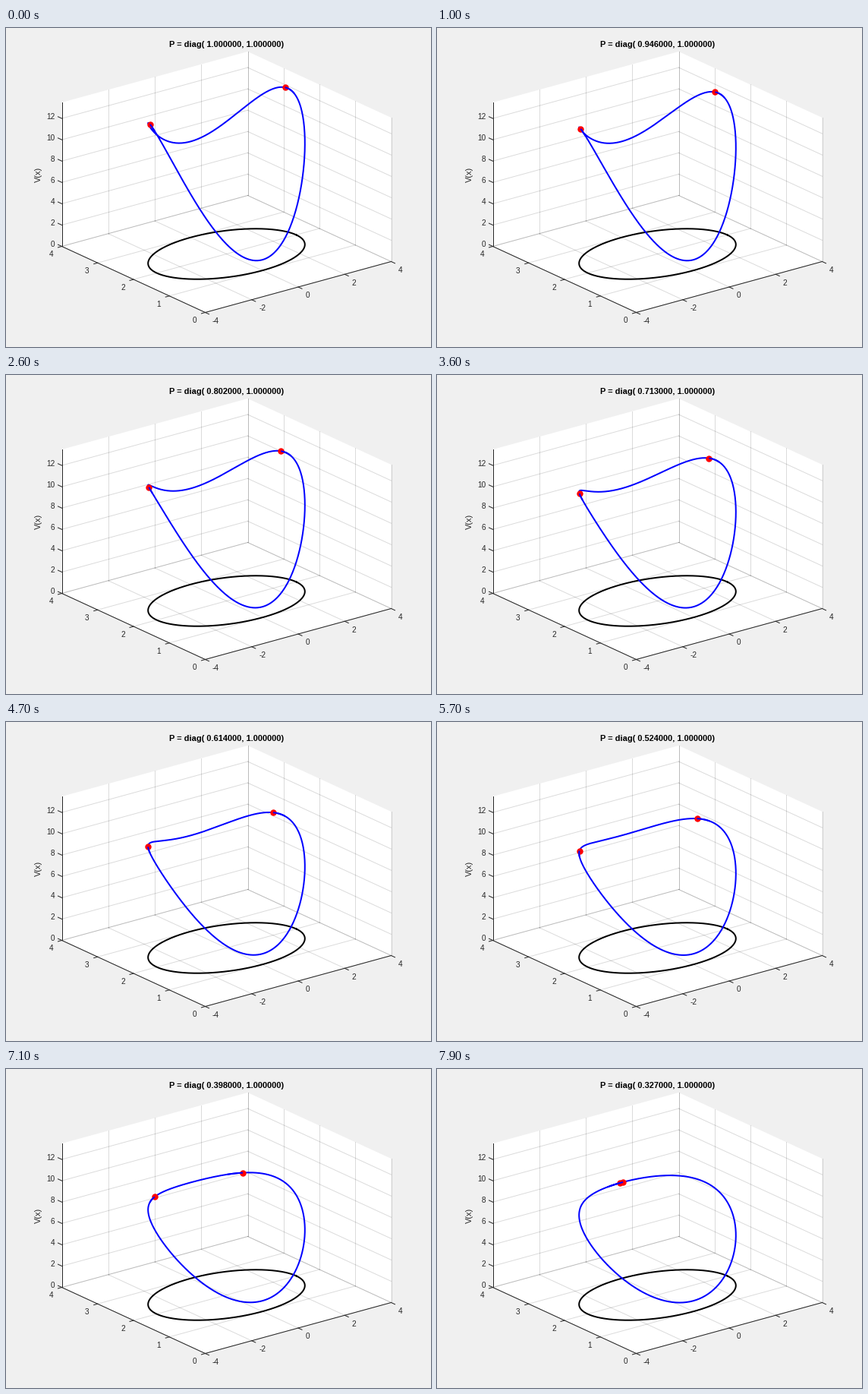
A matplotlib script for the animation above (8000 ms loop, 560 px wide and 420 px high).

```python
import numpy as np
import matplotlib.pyplot as plt
from matplotlib.animation import FuncAnimation

W, H, DPI = 560, 420, 80
PX = 72 / DPI                      # one pixel in points
INK = "#262626"
Z_TOP = 13.5

plt.rcParams["font.family"] = "Liberation Sans"
fig = plt.figure(figsize=(W / DPI, H / DPI), dpi=DPI, facecolor="#f0f0f0")
ax = fig.add_axes([0, 0, 1, 1])
ax.set_xlim(-0.5, W - 0.5)
ax.set_ylim(H - 0.5, -0.5)
ax.axis("off")


def project(x, y, z):
    """Orthographic view of the box to stage pixels."""
    u, v, w = (x + 4) / 8, y / 4, z / Z_TOP
    return 262 + 245 * u - 189 * v, 374 - 67 * u - 87 * v - 189.5 * w


def segment(a, b, **style):
    p, q = project(*a), project(*b)
    return ax.plot([p[0], q[0]], [p[1], q[1]], **style)


def text(x, y, s, size=10, **kw):
    style = dict(color=INK, ha="center", va="center_baseline")
    style.update(kw)
    return ax.text(x, y, s, fontsize=size * PX, **style)


def tick(x, y, z, dx, dy):
    px, py = project(x, y, z)
    ax.plot([px, px + dx], [py, py + dy], color=INK, lw=PX, zorder=1)
    return px, py


# white floor and the two back walls
outline = [(-4, 0, 0), (4, 0, 0), (4, 0, Z_TOP), (4, 4, Z_TOP),
           (-4, 4, Z_TOP), (-4, 4, 0)]
ax.fill(*zip(*(project(*p) for p in outline)), color="white", lw=0, zorder=0)

grid = dict(color="black", alpha=0.14, lw=PX, zorder=0.5)
for x in range(-4, 5, 2):
    segment((x, 0, 0), (x, 4, 0), **grid)
    segment((x, 4, 0), (x, 4, Z_TOP), **grid)
for y in range(5):
    segment((-4, y, 0), (4, y, 0), **grid)
    segment((4, y, 0), (4, y, Z_TOP), **grid)
for z in range(0, 13, 2):
    segment((-4, 4, z), (4, 4, z), **grid)
    segment((4, 0, z), (4, 4, z), **grid)

# axes, ticks and labels
for a, b in [((-4, 0, 0), (4, 0, 0)), ((-4, 0, 0), (-4, 4, 0)),
             ((-4, 4, 0), (-4, 4, Z_TOP))]:
    segment(a, b, color=INK, lw=PX, zorder=1)
for x in range(-4, 5, 2):
    px, py = tick(x, 0, 0, 5, 2.3)
    text(px + 9.5, py + 10.5, str(x), ha="left")
for y in range(5):
    px, py = tick(-4, y, 0, -5, 1.4)
    text(px - 11, py + 10, str(y), ha="right")
for z in range(0, 13, 2):
    px, py = tick(-4, 4, z, -5, -2.3)
    text(px - 9, py - 3, str(z), ha="right")
text(42, 192, "V(x)", 11, rotation=90, va="center")
title = text(290, 21, "", 11, color="black", weight="bold")

# constraint ellipse on the floor, cost curve above it
T = np.linspace(0, 2 * np.pi, 400)


def ellipse(t):
    return 3 * np.cos(t), 2 + np.sin(t)


def lifted(t, p):
    x, y = ellipse(t)
    return project(x, y, p * x**2 + y**2)


ax.plot(*project(*ellipse(T), 0), color="black", lw=2 * PX, zorder=2)
blue = dict(color="blue", lw=2 * PX, solid_capstyle="butt")
curve, = ax.plot([], [], zorder=3, **blue)
dots, = ax.plot([], [], "o", color="red", ms=8.4 * PX, mew=0, zorder=4)
near = [ax.plot([], [], zorder=5, **blue)[0] for _ in range(2)]


def update(i):
    p = 1 - round(8.979 * max(0, i - 4)) / 1000
    title.set_text(f"P = diag( {p:.6f}, 1.000000)")
    curve.set_data(*lifted(T, p))
    s = min(2 / (9 * p - 1), 0.9998)   # sine of the angle where V peaks
    peak = np.arcsin(s)
    peaks = np.array([peak, np.pi - peak])
    dots.set_data(*lifted(peaks, p))
    # the side of the curve facing the viewer passes over each dot
    for line, t in zip(near, peaks):
        side = np.sign(0.228 * np.sin(t) - 0.198 * np.cos(t))
        line.set_data(*lifted(t + side * np.linspace(0, 0.2, 12), p))
    return [curve, dots, title, *near]


anim = FuncAnimation(fig, update, frames=80, interval=100, repeat=True,
                     repeat_delay=0, blit=False)
plt.show()
```
